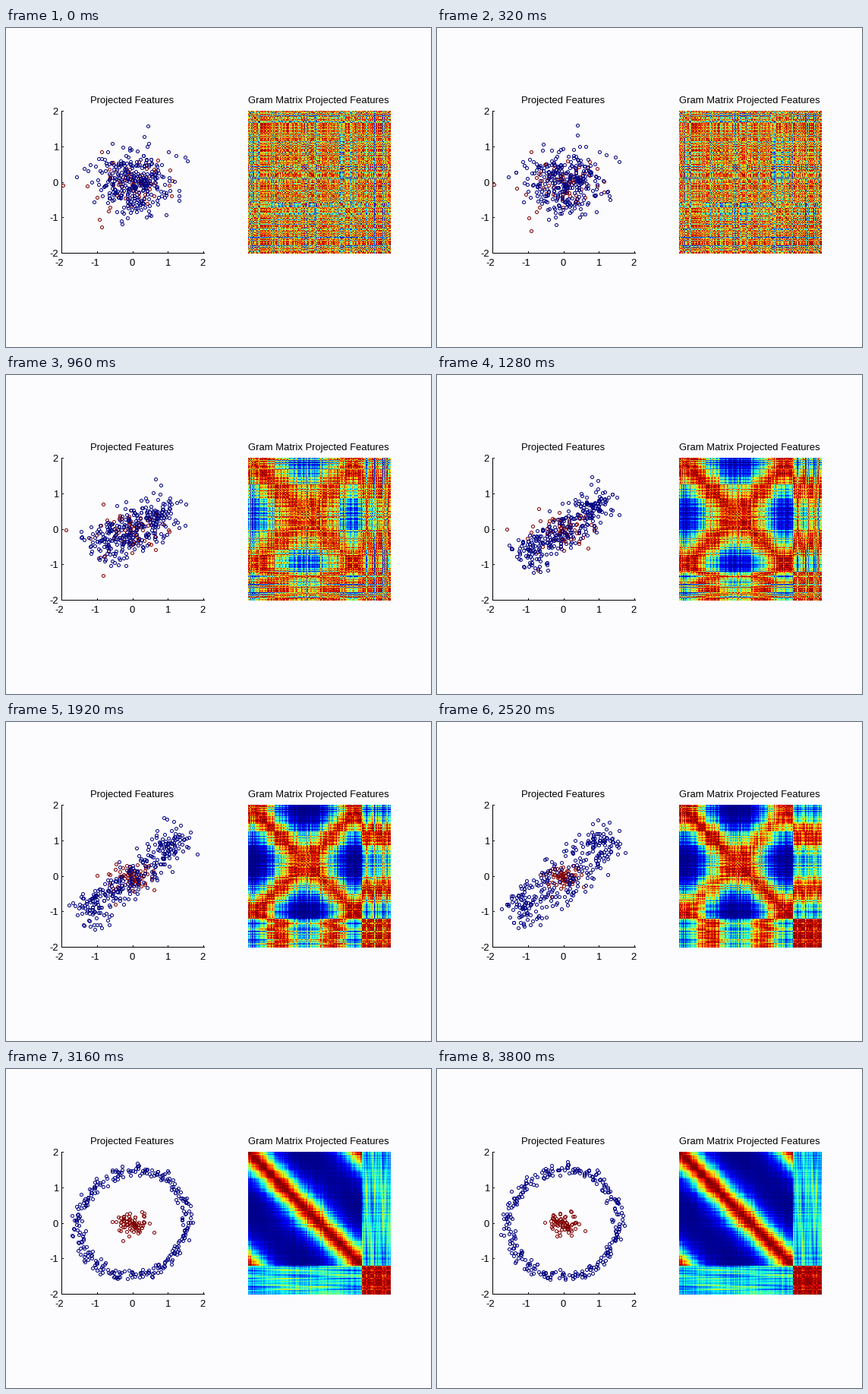
Animation of 560x420 px, one loop 3840 ms. Source, as a matplotlib script:

```python
import numpy as np
import matplotlib.pyplot as plt
from matplotlib.animation import FuncAnimation

W, H, DPI = 560, 420, 100
FRAMES, INTERVAL = 96, 40
RING, CORE = 300, 75
OUTLIER = RING + 32
PX = 72 / DPI  # points per pixel
LEFT, TOP, SIZE = 73, 109, 187
MATRIX_X, MATRIX_SIZE = 319, 188

rng = np.random.default_rng(11)
theta = 2 * np.pi * np.arange(RING) / RING + rng.normal(0, 0.03, RING)
noise_a, noise_b = rng.normal(0, 1, (2, RING + CORE, 2)) * (1, 0.85)
noise_a[OUTLIER] = (-4.6, -0.2)


def ease(frame, start, end):
    t = np.clip((frame - start) / (end - start), 0, 1)
    return t * t * (3 - 2 * t)


def features(frame):
    # The long axis opens first, then the short one, while noise fades.
    along = 0.25 + 1.3 * ease(frame, 0, 48)
    across = 0.06 + 1.44 * ease(frame, 56, 82)
    tilt = np.radians(8 + 31 * ease(frame, 0, 40))
    ring_noise = 0.5 - 0.24 * ease(frame, 4, 34) - 0.16 * ease(frame, 58, 80)
    core_noise = 0.46 - 0.26 * ease(frame, 8, 64)

    phase = 1.5 * frame / (FRAMES - 1)
    pts = noise_a * np.cos(phase) + noise_b * np.sin(phase)
    pts[:RING] *= ring_noise
    pts[RING:] *= core_noise
    u, v = along * np.cos(theta), across * np.sin(theta)
    pts[:RING, 0] += u * np.cos(tilt) - v * np.sin(tilt)
    pts[:RING, 1] += u * np.sin(tilt) + v * np.cos(tilt)
    return np.clip(pts, -1.95, 1.95)


def gram(pts):
    p = pts[::2]
    diff = p[:, None] - p[None]
    return np.exp(-(diff ** 2).sum(axis=2) / 2.25)


def to_px(x, y):
    unit = SIZE / 4
    return LEFT + (x + 2) * unit, TOP + (2 - y) * unit


fig = plt.figure(figsize=(W / DPI, H / DPI), dpi=DPI, facecolor="#fcfcfe")
ax = fig.add_axes([0, 0, 1, 1])


def label(x, y, text, ha="center"):
    ax.text(x, y, text, ha=ha, va="baseline", color="black",
            family="Liberation Sans", fontsize=13 * PX)


def line(x0, y0, x1, y1):
    ax.plot([x0, x1], [y0, y1], color="black", lw=PX, antialiased=False,
            solid_capstyle="butt")


def dots(color):
    return ax.plot([], [], "o", mfc="none", mec=color, ms=4 * PX, mew=PX,
                   antialiased=False)[0]


image = ax.imshow(np.zeros((MATRIX_SIZE, MATRIX_SIZE)), cmap="jet",
                  vmin=0, vmax=1, interpolation="nearest", aspect="auto",
                  extent=(MATRIX_X, MATRIX_X + MATRIX_SIZE,
                          TOP + MATRIX_SIZE, TOP))
ax.set_xlim(0, W)
ax.set_ylim(H, 0)
ax.set_autoscale_on(False)
ax.axis("off")

x0, y0 = to_px(-2, -2)
x1, y1 = to_px(2, 2)
line(x0, y0, x1 + 1, y0)
line(x0, y0, x0, y1)
for v in range(-2, 3):
    tx, ty = to_px(v, v)
    line(tx, y0, tx, y0 - 2)
    line(x0, ty, x0 + 2, ty)
    label(tx - (2.5 if v < 0 else 0.5), 313, str(v))
    label(69, ty + 5, str(v), "right")
label(166, 99, "Projected Features")
label(412, 99, "Gram Matrix Projected Features")

core_dots, ring_dots = dots("#800000"), dots("#000080")


def draw(frame):
    pts = features(frame)
    ring_dots.set_data(*to_px(*pts[:RING].T))
    core_dots.set_data(*to_px(*pts[RING:].T))
    image.set_data(gram(pts))
    return image, core_dots, ring_dots


anim = FuncAnimation(fig, draw, frames=FRAMES, interval=INTERVAL,
                     repeat=True, repeat_delay=0, blit=False)
plt.show()
```
